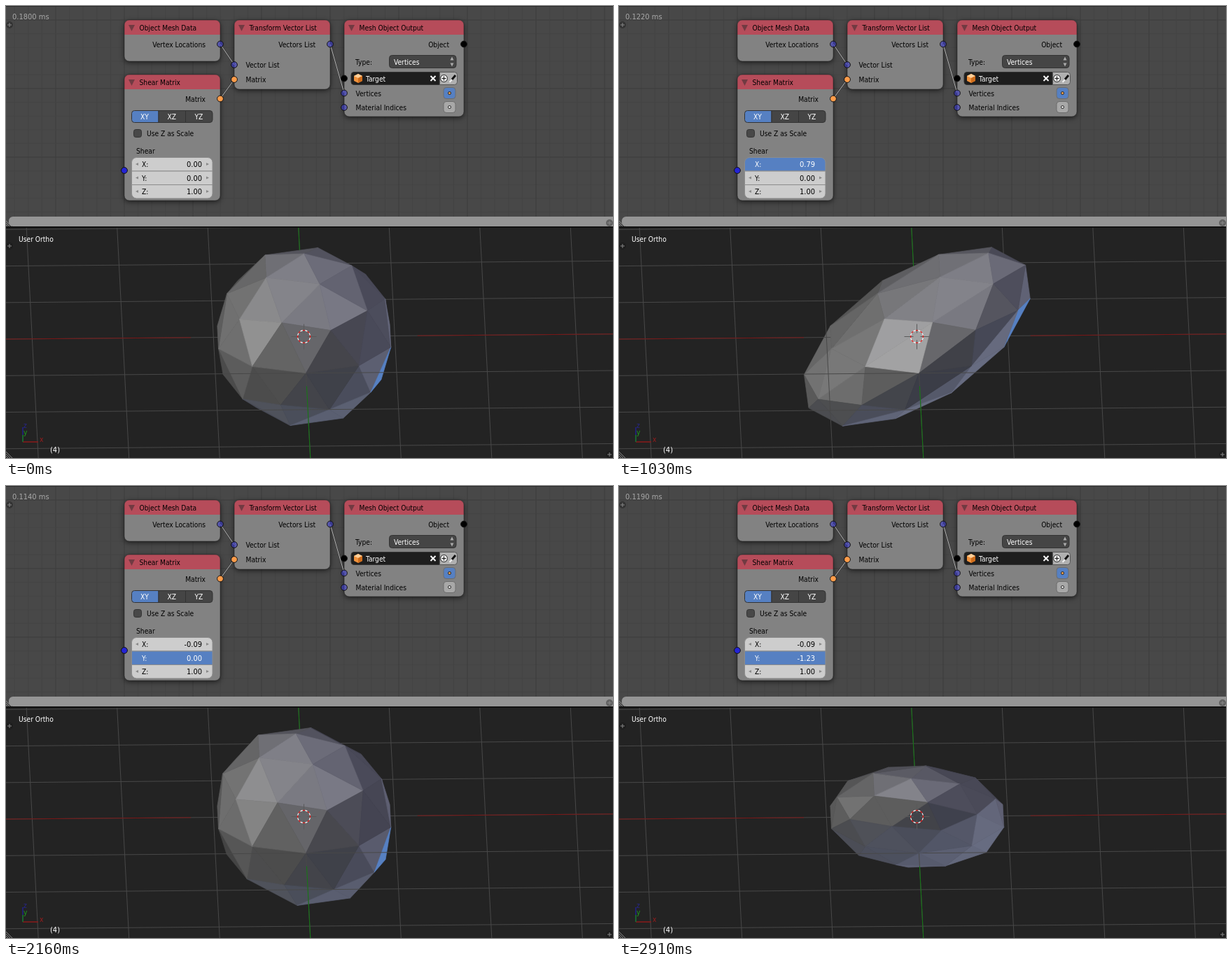
An HTML page with a canvas that plays this animation: 867 by 646 pixels, repeating every 3.02 s.

```html
<!DOCTYPE html>
<html lang="en">
<head>
<meta charset="utf-8">
<title>Shear matrix</title>
<style>
html, body { margin: 0; width: 100%; height: 100%; overflow: hidden; background: #232323; }
canvas { display: block; }
</style>
</head>
<body>
<canvas id="stage" width="867" height="646"></canvas>
<script>
const g = document.getElementById('stage').getContext('2d');
const LOOP = 3020, BLUE = '#5680c2', CELL = 19.6;
const HOVER = 90, PRESS_X = 280, DRAG = 430, RELEASE_X = 1800, PRESS_Y = 2020;

// ---------- timing ----------
// The editor redraws in bursts: first time, last time, count.
const steps = [0, HOVER, PRESS_X];
for (const [a, b, n] of [[DRAG, 830, 10], [880, 1610, 17], [1760, 2160, 10], [2250, 2820, 13], [2870, 2910, 2]])
  for (let i = 0; i < n; i++) steps.push(Math.ceil((a + (b - a) * i / (n - 1)) / 10 - .5) * 10);

// Each drag swings from one turning point to the next.
function swing(points, t) {
  let [at, value] = points[0];
  for (const [end, goal] of points.slice(1)) {
    const p = Math.min(1, Math.max(0, (t - at) / (end - at)));
    if (p < 1) return value + (goal - value) * (1 - Math.cos(Math.PI * p)) / 2;
    [at, value] = [end, goal];
  }
  return value;
}
const shearX = t => swing([[335, 0], [880, 1.29], [1350, -1.18], [1610, -.09]], t);
const shearY = t => swing([[2200, 0], [2440, .69], [2920, -1.23]], t);
const evalTime = t => t < DRAG ? .18 : Math.round(118 + 4 * Math.cos((t - 830) / 423)) / 1000;

// ---------- drawing helpers ----------
function text(s, x, y, color = '#000', align = 'left', size = 10.2) {
  g.font = `condensed ${size}px "DejaVu Sans Condensed", "DejaVu Sans", sans-serif`;
  g.textAlign = align;
  g.fillStyle = color;
  g.fillText(s, x, y + 4);
}
function line(x1, y1, x2, y2, color, width = 1) {
  g.strokeStyle = color;
  g.lineWidth = width;
  g.beginPath();
  g.moveTo(x1, y1);
  g.lineTo(x2, y2);
  g.stroke();
}
function paint(fill, edge) {
  g.fillStyle = fill;
  g.fill();
  if (!edge) return;
  g.strokeStyle = edge;
  g.lineWidth = 1;
  g.stroke();
}
function box(x, y, w, h, r, fill, edge) {
  g.beginPath();
  g.roundRect(x, y, w, h, r);
  paint(fill, edge);
}
function dot(x, y, r, fill, edge) {
  g.beginPath();
  g.arc(x, y, r, 0, 7);
  paint(fill, edge);
}
function poly(points, fill) {
  g.beginPath();
  points.forEach(p => g.lineTo(...p));
  g.closePath();
  paint(fill);
}
// Triangle pointing along (dx, dy).
function arrow(x, y, dx, dy, fill) {
  poly([[x + dx, y + dy], [x - dx + dy, y - dy + dx], [x - dx - dy, y - dy - dx]], fill);
}
function cross(x, y, r, color, width) {
  line(x - r, y, x + r, y, color, width);
  line(x, y - r, x, y + r, color, width);
}
function plus(x, y) {
  dot(x, y, 5, 'rgba(20,20,20,.4)');
  cross(x, y, 3, '#888');
}
function hatch(y) {
  for (let i = 3; i < 12; i += 3) line(0, y - i, i, y, '#888');
}

// ---------- node editor ----------
const VECTOR = 'rgba(60,60,205,.6)', MATRIX = '#ff9c4a', BLACK = '#000';
let sockets;

function node(title, x, y, w, h) {
  g.save();
  g.shadowColor = 'rgba(0,0,0,.6)';
  g.shadowBlur = 7;
  g.shadowOffsetY = 2;
  box(x, y, w, h, 7, '#828282');
  g.restore();
  box(x, y, w, 21, [7, 7, 0, 0], '#b64c5a');
  box(x, y, w, h, 7, 'transparent', 'rgba(30,30,30,.5)');
  arrow(x + 10.5, y + 11.5, 0, 4.5, '#713a42');
  text(title, x + 21.5, y + 10.5);
}
function socket(x, y, color) {
  sockets.push([x, y, color]);
  return [x, y];
}
function input(label, x, y, color) {
  text(label, x + 16.5, y);
  return socket(x, y, color);
}
function output(label, x, y, color) {
  text(label, x - 21, y, '#000', 'right');
  return socket(x, y, color);
}
function link(a, b) {
  line(...a, ...b, '#333', 2);
  line(...a, ...b, '#b8b8b8', 1);
}
function field(row, label, value, state) {
  const on = state === 'on', y = 216.5 + row * 19.5, ink = on ? '#fff' : '#000';
  const top = row ? 0 : 7, bottom = row < 2 ? 0 : 7;
  box(179.5, y, 115.5, 19.5, [top, top, bottom, bottom],
    on ? BLUE : state === 'hover' ? '#dedede' : '#cdcdcd', '#8c8c8c');
  text(label, 194, y + 9.5, ink);
  text(value.toFixed(2), 280, y + 9.5, ink, 'right', 11);
  if (on) return;
  arrow(187, y + 9.5, -2, 0, '#888');
  arrow(288, y + 9.5, 2, 0, '#888');
}
function background() {
  g.fillStyle = '#484848';
  g.fillRect(0, 0, 867, 316);
  for (let i = -9; i < 37; i++) {
    const color = i % 5 ? '#444' : '#3d3d3d', x = 169 + i * CELL, y = 20 + i * CELL;
    line(x, 0, x, 301, color);
    line(0, y, 867, y, color);
  }
  line(0, .5, 867, .5, '#2a2a2a');
}
function shearNode(t, x, y) {
  node('Shear Matrix', 169, 98, 137, 180);
  const out = output('Matrix', 306, 132.5, MATRIX);
  ['XY', 'XZ', 'YZ'].forEach((s, i) => {
    const left = i ? 0 : 4, right = i < 2 ? 0 : 4;
    box(179.5 + i * 38.5, 149.5, 38.5, 17, [left, right, right, left], i ? '#454545' : BLUE, '#333');
    text(s, 198 + i * 38.7, 157.5, '#fff', 'center');
  });
  box(182.5, 176.5, 11, 11, 3, '#484848', '#333');
  text('Use Z as Scale', 201, 182);
  text('Shear', 186, 206.5);
  field(0, 'X:', x, t >= PRESS_X && t < RELEASE_X ? 'on' : t === HOVER ? 'hover' : '');
  field(1, 'Y:', y, t >= PRESS_Y ? 'on' : '');
  field(2, 'Z:', 1);
  socket(169, 235, '#2424d4');
  return out;
}
function objectPicker() {
  box(493, 94.5, 126, 18, [4, 0, 0, 4], '#1e1e1e', '#333');
  poly([[503, 97], [509, 100], [509, 107], [503, 110], [497, 107], [497, 100]], '#f0923c');
  poly([[503, 97], [509, 100], [503, 103], [497, 100]], '#ffd09a');
  poly([[503, 103], [509, 100], [509, 107], [503, 110]], '#cf6d1c');
  text('Target', 514, 104, '#fff');
  line(606.5, 100, 613.5, 107, '#fff', 2);
  line(613.5, 100, 606.5, 107, '#fff', 2);
  box(619.5, 94.5, 25, 18, [0, 4, 4, 0], '#b0b0b0', '#555');
  dot(625.5, 103.5, 5, '#e8e8e8', '#222');
  cross(625.5, 103.5, 3, '#111');
  line(633.5, 109, 638, 104, '#eee', 2);
  line(637, 105, 642, 99, '#111', 3);
}
function outputNode() {
  node('Mesh Object Output', 483, 20, 171, 138);
  output('Object', 654, 54.5, BLACK);
  text('Type:', 499, 79.5);
  box(547.5, 70.5, 95.5, 18, 4, '#454545', '#333');
  text('Vertices', 554, 79.5, '#fff');
  arrow(637, 75, 0, -2.5, '#aaa');
  arrow(637, 84, 0, 2.5, '#aaa');
  objectPicker();
  socket(483, 103.5, BLACK);
  const vertices = input('Vertices', 483, 124.5, VECTOR);
  input('Material Indices', 483, 145, VECTOR);
  for (const [y, fill, core] of [[124.5, BLUE, '#f0a04c'], [144.5, '#a8a8a8', '#ddd']]) {
    box(625, y - 8, 17, 16, 4, fill, '#6c6c6c');
    dot(633.5, y, 2, core, '#222');
  }
  return vertices;
}
function editor(t, x, y) {
  sockets = [];
  background();
  text(evalTime(t).toFixed(4) + ' ms', 9, 15, '#a8a8a8', 'left', 11);
  plus(5, 27);

  node('Object Mesh Data', 169, 20, 137, 59);
  const locations = output('Vertex Locations', 306, 54.5, VECTOR);
  node('Transform Vector List', 326, 20, 137, 99);
  const moved = output('Vectors List', 463, 54.5, VECTOR);
  const list = input('Vector List', 326, 84, VECTOR);
  const matrix = input('Matrix', 326, 105, MATRIX);
  link(locations, list);
  link(shearNode(t, x, y), matrix);
  link(moved, outputNode());
  for (const [sx, sy, color] of sockets) dot(sx, sy, 4.4, color, '#111');

  box(4, 301, 880, 14, 6, '#959595');
  hatch(316);
  plus(862, 310);
  g.fillStyle = '#111';
  g.fillRect(0, 315, 867, 2);
}

// ---------- mesh ----------
const dotp = (a, b) => a[0] * b[0] + a[1] * b[1] + a[2] * b[2];
const sub = (a, b) => a.map((c, i) => c - b[i]);
const crossp = (a, b) => [a[1] * b[2] - a[2] * b[1], a[2] * b[0] - a[0] * b[2], a[0] * b[1] - a[1] * b[0]];
const unit = v => v.map(c => c / Math.hypot(...v));
const mid = (a, b) => unit(a.map((c, i) => c + b[i]));
const ring = (deg, z) => unit([2 * Math.cos(deg * Math.PI / 180), 2 * Math.sin(deg * Math.PI / 180), z]);

// Icosphere: every icosahedron face split into four.
const faces = [];
function split(a, b, c) {
  const ab = mid(a, b), bc = mid(b, c), ca = mid(c, a);
  faces.push([a, ab, ca], [b, bc, ab], [c, ca, bc], [ab, bc, ca]);
}
for (let deg = 0; deg < 360; deg += 72) {
  const up = ring(deg, 1), up2 = ring(deg + 72, 1), low = ring(deg + 36, -1), low2 = ring(deg + 108, -1);
  split([0, 0, 1], up, up2);
  split(up, low, up2);
  split(low, low2, up2);
  split([0, 0, -1], low2, low);
}

const UNIT = 129.5, turn = -.0208, tilt = .415;
const right = [Math.cos(turn), Math.sin(turn), 0];
const upward = [-Math.sin(turn) * Math.sin(tilt), Math.cos(turn) * Math.sin(tilt), Math.cos(tilt)];
const toward = crossp(right, upward);
const project = v => [425.8 + UNIT * dotp(v, right), 472.5 - UNIT * dotp(v, upward)];

// View-space direction, diffuse colour, specular strength.
const lights = [
  [[-.892, .3, .9], [120, 120, 120], 100],
  [[.588, .46, .248], [75, 75, 90], 18],
  [[.216, -.392, -.216], [120, 126, 150], 0]
].map(([v, color, gloss]) => {
  const dir = unit(v);
  return { dir, color, gloss, half: mid(dir, [0, 0, 1]) };
});

function shade(n) {
  const v = [right, upward, toward].map(axis => dotp(n, axis)), rgb = [0, 0, 0];
  for (const { dir, color, gloss, half } of lights) {
    const d = dotp(v, dir);
    if (d <= 0) continue;
    const shine = gloss * Math.max(0, dotp(v, half)) ** 50;
    color.forEach((c, i) => rgb[i] += c * d + shine);
  }
  return rgb[2] - rgb[0] > 26 ? BLUE : `rgb(${rgb.map(Math.round)})`;
}
function halfMesh(x, y, side) {
  for (const face of faces) {
    if ((face[0][2] + face[1][2] + face[2][2]) * side < 0) continue;
    const [a, b, c] = face.map(v => [v[0] + x * v[2], v[1] + y * v[2], v[2]]);
    let n = unit(crossp(sub(b, a), sub(c, a)));
    if (dotp(n, a) < 0) n = n.map(r => -r);
    if (dotp(n, toward) <= 0) continue;
    const color = shade(n);
    poly([a, b, c].map(project), color);
    g.strokeStyle = color;
    g.lineWidth = .7;
    g.stroke();
  }
}

// ---------- 3D view ----------
function floorLine(a, b, color) {
  line(...project([...a, 0]), ...project([...b, 0]), color);
}
function floor() {
  for (let i = -4; i <= 4; i++) {
    floorLine([i, -4], [i, 4], '#484848');
    floorLine([-4, i], [4, i], '#484848');
  }
  for (const s of [-1, 1]) {
    floorLine([1.25 * s, 0], [4 * s, 0], '#7a1515');
    floorLine([0, 1.36 * s], [0, 4 * s], '#137a13');
  }
}
function cursor() {
  const x = 425.5, y = 472.5, arc = Math.PI / 8;
  for (const s of [-1, 1]) {
    line(x + 5 * s, y, x + 18 * s, y, '#5a5a5a');
    line(x, y + 5 * s, x, y + 18 * s, '#5a5a5a');
  }
  for (let i = 0; i < 16; i++) {
    g.beginPath();
    g.arc(x, y, 9, (i - 4.5) * arc, (i - 3.5) * arc);
    g.strokeStyle = i % 2 ? '#fff' : '#f01818';
    g.lineWidth = 1.2;
    g.stroke();
  }
}
function gizmo() {
  line(24, 623, 46, 623, '#8a1a1a', 1.5);
  line(24, 623, 24, 602, '#23238a', 1.5);
  line(24, 623, 24, 613, '#1a7a1a', 1.5);
  text('x', 48, 618.5, '#9a1c1c');
  text('y', 25, 609, '#1f9a1f');
  text('z', 25, 599, '#26268a');
}
function view(x, y) {
  g.save();
  g.beginPath();
  g.rect(0, 317, 867, 329);
  g.clip();
  g.fillStyle = '#232323';
  g.fillRect(0, 317, 867, 329);
  // The floor cuts the mesh at its equator, so it goes between the halves.
  halfMesh(x, y, -1);
  floor();
  halfMesh(x, y, 1);
  cursor();
  gizmo();
  text('User Ortho', 18, 332.5, '#fff');
  text('(4)', 63, 634, '#fff', 'left', 11);
  plus(5, 343);
  plus(862, 641);
  hatch(646);
  g.restore();
}

function frame(now) {
  const time = now % LOOP, t = steps.filter(s => s <= time).pop();
  const x = shearX(t), y = shearY(t);
  editor(t, x, y);
  view(x, y);
  requestAnimationFrame(frame);
}
requestAnimationFrame(frame);
</script>
</body>
</html>
```
